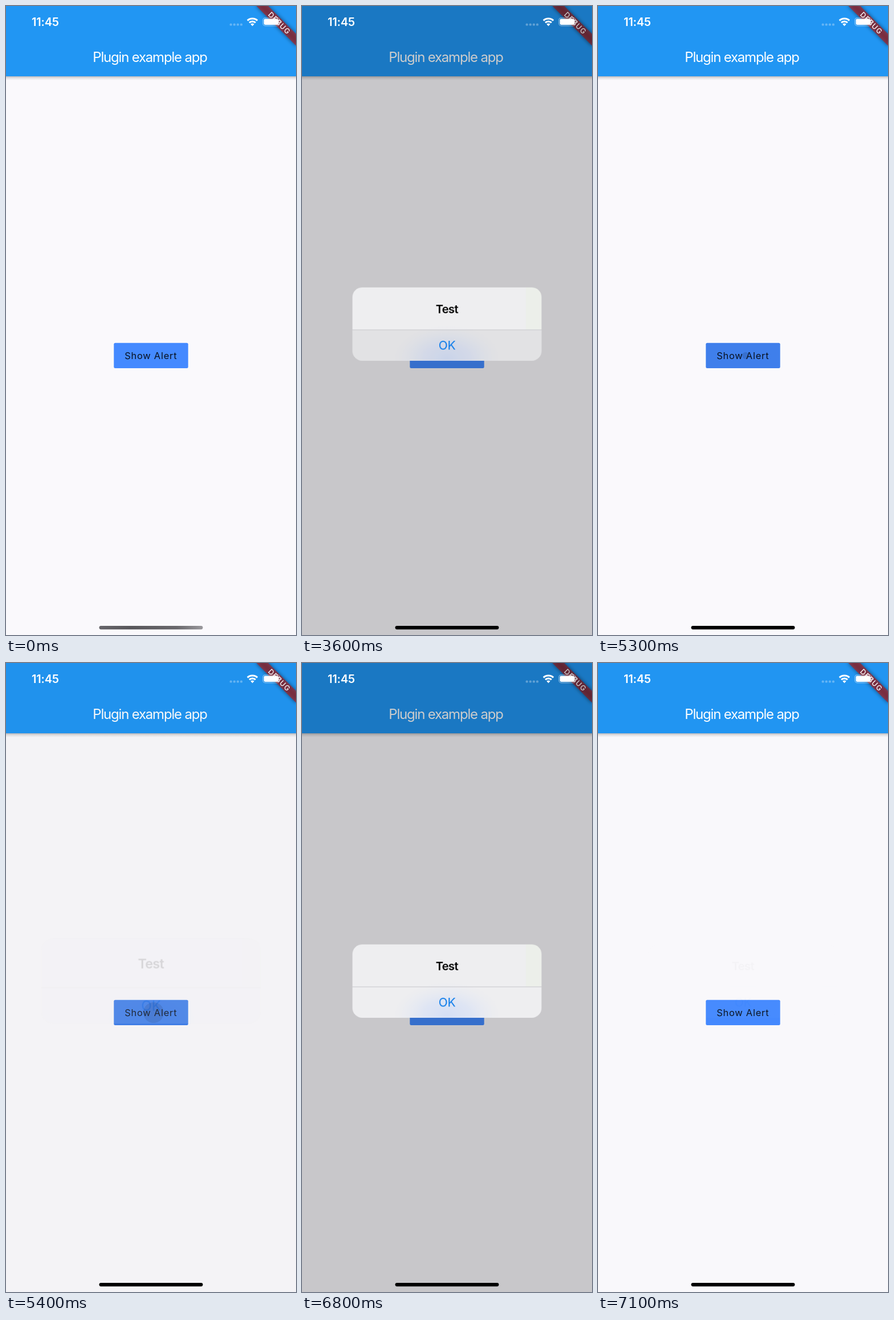
These frames come from a looping animation (509x1101 px, 7.2 s). An HTML page:

```html
<!DOCTYPE html>
<html lang="en">
<head>
<meta charset="utf-8">
<title>Alert demo</title>
<style>
  html, body { margin: 0; width: 100%; height: 100%; overflow: hidden; background: #faf9fc; }
  svg { display: block; width: 100%; height: 100%; }
  text { font-family: Inter, Roboto, sans-serif; font-optical-sizing: none; white-space: pre; }

  .title { font-size: 24px; letter-spacing: -1.2px; fill: #fff; }
  .label { font-size: 16.5px; letter-spacing: .72px; fill: #091221; }
  .banner { font-size: 12.5px; font-weight: 500; letter-spacing: 1.2px; fill: #fff; }
  .clock { font-size: 20px; font-weight: 600; letter-spacing: -.2px; fill: #fff; }
  .heading { font-size: 20.2px; font-weight: 600; letter-spacing: -.7px; }
  .ok { font-size: 21px; fill: #0c7bea; }

  /* The screen refreshes every 100 ms, so every change is a hard step. */
  .dim, .alert, .zoom, .pressed, .tint, .ripple, .bar-idle {
    animation: 7200ms step-end infinite;
  }
  .dim, .alert { animation-name: fade; }
  .zoom { animation-name: zoom; transform-origin: 254.5px 557px; }
  .pressed { animation-name: press; }
  .tint { animation-name: tint; }
  .ripple { animation-name: ripple; transform-origin: 259px 612px; }
  .bar-idle { animation-name: idle; }

  @keyframes fade {
    0% { opacity: 0; }
    33.333% { opacity: 1; }
    52.777% { opacity: .75; }
    54.166% { opacity: .27; }
    55.555% { opacity: .08; }
    56.944% { opacity: .02; }
    58.333% { opacity: 0; }
    75% { opacity: .12; }
    76.388% { opacity: .5; }
    77.777% { opacity: .83; }
    79.166% { opacity: .97; }
    80.555% { opacity: 1; }
    95.833% { opacity: .6; }
    97.222% { opacity: .15; }
    98.611%, 100% { opacity: .02; }
  }
  @keyframes zoom {
    0% { transform: none; }
    75% { transform: scale(1.16); }
    76.388% { transform: scale(1.08); }
    77.777% { transform: scale(1.025); }
    79.166% { transform: scale(1.005); }
    80.555%, 100% { transform: none; }
  }
  @keyframes press {
    0% { opacity: 0; }
    50% { opacity: .05; }
    52.777% { opacity: 0; }
    93.055% { opacity: .05; }
    94.444%, 100% { opacity: 0; }
  }
  @keyframes tint {
    0% { opacity: 0; }
    72.222% { opacity: .04; }
    73.611% { opacity: .08; }
    77.777% { opacity: .05; }
    79.166% { opacity: .02; }
    80.555%, 100% { opacity: 0; }
  }
  @keyframes ripple {
    0% { opacity: 0; transform: scale(0); }
    73.611% { opacity: .12; transform: scale(6); }
    75% { opacity: .1; transform: scale(18); }
    76.388% { opacity: .08; transform: scale(40); }
    77.777% { opacity: .04; transform: scale(70); }
    79.166%, 100% { opacity: 0; transform: scale(75); }
  }
  @keyframes idle {
    0% { opacity: 1; }
    33.333%, 100% { opacity: 0; }
  }
</style>
</head>
<body>
<svg viewBox="0 0 509 1101" preserveAspectRatio="none">
  <defs>
    <linearGradient id="shade" x2="0" y2="1">
      <stop stop-opacity=".26"/>
      <stop offset=".4" stop-opacity=".1"/>
      <stop offset="1" stop-opacity="0"/>
    </linearGradient>
    <linearGradient id="idle">
      <stop stop-color="#66656a"/>
      <stop offset=".3" stop-color="#58575b"/>
      <stop offset=".75" stop-color="#69686c"/>
      <stop offset="1" stop-color="#9a999d"/>
    </linearGradient>
    <radialGradient id="glow">
      <stop stop-color="#d5dff6"/>
      <stop offset=".45" stop-color="#dbe3f5" stop-opacity=".8"/>
      <stop offset="1" stop-color="#e6eaf4" stop-opacity="0"/>
    </radialGradient>
    <filter id="soft" x="-20%" y="-100%" width="140%" height="300%">
      <feGaussianBlur stdDeviation="3.5"/>
    </filter>
    <clipPath id="button"><rect x="189.3" y="589.8" width="130.4" height="44.2" rx="2.5"/></clipPath>
    <clipPath id="sheet"><rect x="88.5" y="492.6" width="332" height="128.4" rx="17.2"/></clipPath>
    <clipPath id="wedge"><path d="M432.5 35.2L418 19H447Z"/></clipPath>
  </defs>

  <!-- App -->
  <rect width="509" height="1101" fill="#faf9fc"/>
  <rect y="123" width="509" height="7" fill="url(#shade)"/>
  <rect width="509" height="123" fill="#2196f3"/>
  <text class="title" x="152.3" y="97.5">Plugin example app</text>

  <g clip-path="url(#button)">
    <rect x="189" y="589" width="131" height="46" fill="#448aff"/>
    <rect class="tint" x="189" y="589" width="131" height="46"/>
    <circle class="ripple" cx="259" cy="612" r="1"/>
  </g>
  <text class="label" x="208.2" y="618">Show Alert</text>

  <g transform="translate(509 0) rotate(45)">
    <rect x="-49.2" y="34.4" width="98.4" height="14.8" fill-opacity=".5" filter="url(#soft)"/>
    <rect x="-49.2" y="34.4" width="98.4" height="14.8" fill="#b71c1c" fill-opacity=".63"/>
    <text class="banner" x=".6" y="46.3" text-anchor="middle">DEBUG</text>
  </g>

  <!-- Alert -->
  <rect class="dim" width="509" height="1101" fill-opacity=".2"/>
  <g class="alert"><g class="zoom">
    <g clip-path="url(#sheet)">
      <rect x="88" y="492" width="333" height="130" fill="#eeeef0"/>
      <rect x="393" y="492" width="28" height="75" fill="#ecefea"/>
      <ellipse cx="254.5" cy="616" rx="92" ry="56" fill="url(#glow)"/>
      <rect class="pressed" x="88" y="567" width="333" height="55"/>
      <rect x="88" y="566.3" width="333" height="1" fill="#c9c9cd"/>
    </g>
    <text class="heading" x="254.2" y="537.3" text-anchor="middle">Test</text>
    <text class="ok" x="254.6" y="601.8" text-anchor="middle">OK</text>
  </g></g>

  <!-- System status and home bar -->
  <text class="clock" x="45" y="35">11:45</text>
  <g fill="#fff" fill-opacity=".3">
    <rect x="392.6" y="30.6" width="4.2" height="4" rx="1.6"/>
    <rect x="398.7" y="30.6" width="4.2" height="4" rx="1.6"/>
    <rect x="404.8" y="30.6" width="4.2" height="4" rx="1.6"/>
    <rect x="410.9" y="30.6" width="4.2" height="4" rx="1.6"/>
  </g>
  <g clip-path="url(#wedge)" fill="none" stroke="#fff" stroke-width="3">
    <circle cx="432.5" cy="35" r="12.9"/>
    <circle cx="432.5" cy="35" r="8"/>
    <circle cx="432.5" cy="35" r="2.3" stroke-width="4.6"/>
  </g>
  <rect x="450.9" y="20.8" width="29.2" height="13.8" rx="4" fill="none" stroke="#fff" stroke-opacity=".45" stroke-width="1.2"/>
  <rect x="452.6" y="22.4" width="25.8" height="10.6" rx="2.4" fill="#fff"/>
  <path d="M481.8 25.3q2 .9 2 2.4t-2 2.4z" fill="#fff" fill-opacity=".5"/>
  <rect x="163.5" y="1085" width="182" height="6.2" rx="3.1"/>
  <g class="bar-idle">
    <rect x="162" y="1084" width="185" height="8.2" fill="#faf9fc"/>
    <rect x="163.5" y="1085" width="182" height="6.2" rx="3.1" fill="url(#idle)"/>
  </g>
</svg>
</body>
</html>
```
